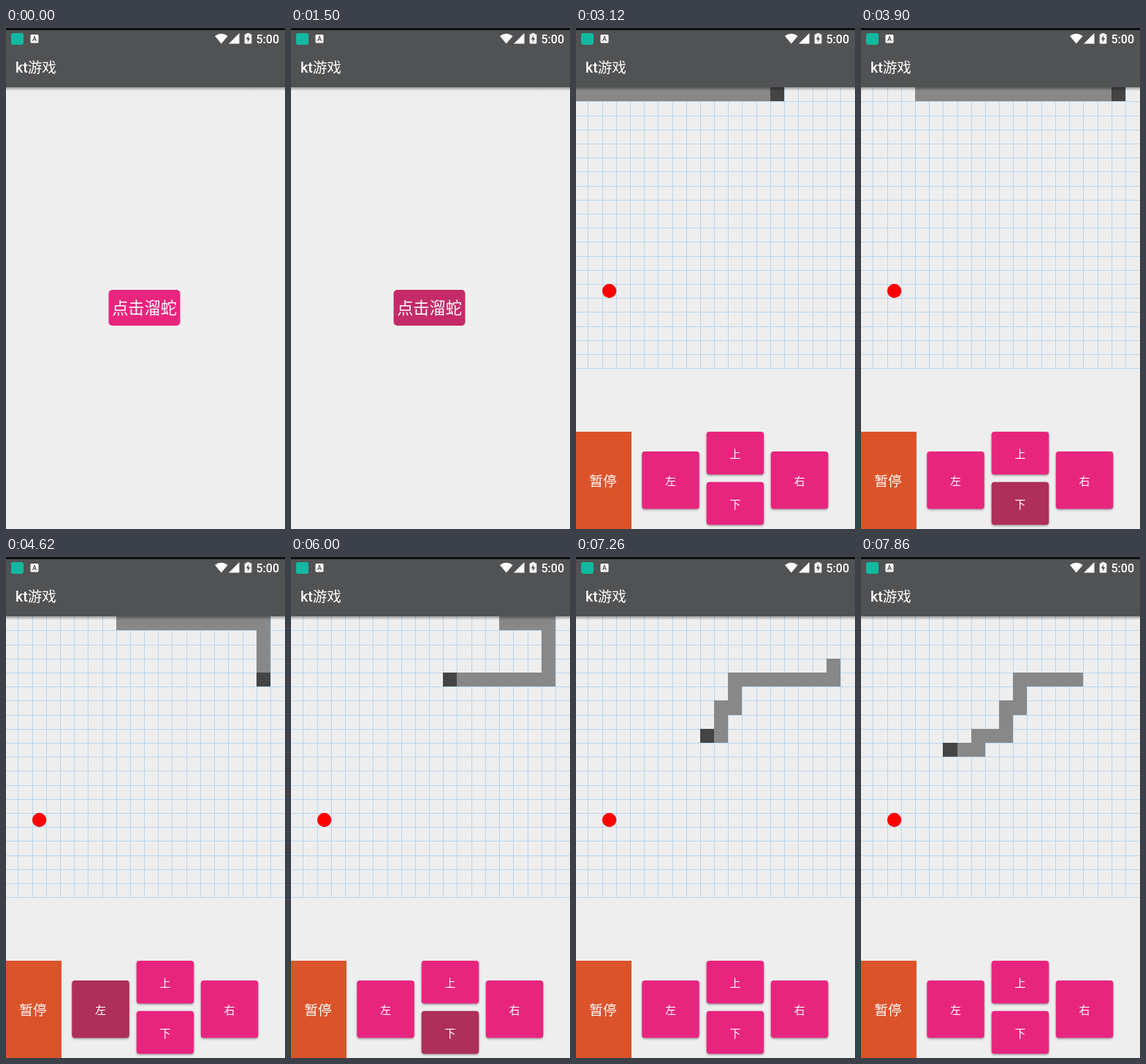
These frames come from a looping animation (382x685 px, 8 s). An HTML page with a canvas:

```html
<!DOCTYPE html>
<html lang="zh-CN">
<head>
<meta charset="utf-8">
<style>
html, body { margin: 0; width: 100%; height: 100%; overflow: hidden; background: #eee; }
canvas { display: block; width: 382px; height: 685px; }
</style>
</head>
<body>
<canvas id="stage"></canvas>
<script>
const W = 382, H = 685, LOOP = 8000, TICK = 60, CELL = 19.2, LENGTH = 15;
const PINK = [232, 37, 126], DARK = [174, 47, 90];
const FONT = 'Roboto, "Noto Sans CJK SC", "Noto Sans CJK", sans-serif';

const canvas = document.getElementById('stage');
const ctx = canvas.getContext('2d');
const dpr = window.devicePixelRatio || 1;
canvas.width = W * dpr;
canvas.height = H * dpr;

// Times of the snake's steps and of the taps on the direction buttons
const steps = [3240, 3420, 3660, 3840, 4020, 4200, 4380, 4620, 4800, 4980, 5160, 5460, 5580,
  5760, 5940, 6120, 6300, 6540, 6720, 6900, 7140, 7320, 7500, 7680, 7860];
const taps = {
  左: [4620, 6360, 6840, 7500],
  下: [3840, 5940, 6600, 7320]
};

const path = [[0, 0]];
for (const [dx, dy, n] of [[1, 0, 18], [0, 1, 4], [-1, 0, 7], [0, 1, 2], [-1, 0, 1],
  [0, 1, 2], [-1, 0, 2], [0, 1, 1], [-1, 0, 2]]) {
  for (let i = 0; i < n; i++) {
    const [x, y] = path[path.length - 1];
    path.push([x + dx, y + dy]);
  }
}

const colX = c => Math.floor(CELL * c - 2.4);
const rowY = r => Math.round(CELL * r + 81.1);

function rect(x, y, w, h, color) {
  ctx.fillStyle = color;
  ctx.fillRect(x, y, w, h);
}

function shape(points, color) {
  ctx.fillStyle = color;
  ctx.beginPath();
  points.forEach(p => ctx.lineTo(...p));
  ctx.fill();
}

function rounded(x, y, w, h, r, color) {
  ctx.fillStyle = color;
  ctx.beginPath();
  ctx.roundRect(x, y, w, h, r);
  ctx.fill();
}

function text(str, x, y, size, weight = 400, align = 'left', color = '#fff') {
  ctx.font = `${weight} ${size}px ${FONT}`;
  ctx.textAlign = align;
  ctx.fillStyle = color;
  ctx.fillText(str, x, y);
}

const label = (str, x, y, size) => text(str, x, y + size * 0.38, size, 400, 'center');

const pinkAt = k => `rgb(${PINK.map((v, i) => v + (DARK[i] - v) * k)})`;

function tapLevel(name, t) {
  const start = (taps[name] || []).findLast(s => s <= t);
  return start === undefined ? 0 : Math.max(0, Math.min(1, (180 - t + start) / 120));
}

function button(name, x, y, h, t) {
  ctx.save();
  ctx.shadowColor = 'rgba(0,0,0,.35)';
  ctx.shadowBlur = 3 * dpr;
  ctx.shadowOffsetY = 1.5 * dpr;
  rounded(x, y, 78.5, h, 4, pinkAt(tapLevel(name, t)));
  ctx.restore();
  label(name, x + 39.2, y + h / 2 + 1, 15);
}

function drawGame(t) {
  for (let c = 1; c <= 19; c++) rect(colX(c), 81, 1, 384, '#b9d6ee');
  for (let r = 1; r <= 20; r++) rect(0, rowY(r), W, 1, '#b9d6ee');

  ctx.fillStyle = '#f00';
  ctx.beginPath();
  ctx.arc(45.6, 359.5, 9.7, 0, 7);
  ctx.fill();

  const moved = steps.filter(s => s <= t).length;
  path.slice(moved, moved + LENGTH).forEach(([c, r], i) => {
    const x = colX(c), y = rowY(r);
    rect(x, y, colX(c + 1) - x, rowY(r + 1) - y, i === LENGTH - 1 ? '#444' : '#888');
  });

  rect(0, 552, 76, 140, '#dc532a');
  label(t < 3120 ? '开始' : '暂停', 37, 619, 18.7);
  button('左', 90.3, 579, 78.5, t);
  button('上', 178.7, 552, 58.5, t);
  button('下', 178.7, 620.7, 58.5, t);
  button('右', 266.8, 579, 78.5, t);
}

function drawMenu(t) {
  const k = t < 1500 ? 0 : t < 1620 ? 0.6 : 1;
  rounded(140.5, 358, 98, 49, 5, pinkAt(k));
  label('点击溜蛇', 189.5, 383, 22.2);
}

function drawToolbar() {
  const shade = ctx.createLinearGradient(0, 81, 0, 86);
  shade.addColorStop(0, 'rgba(0,0,0,.35)');
  shade.addColorStop(1, 'rgba(0,0,0,0)');
  rect(0, 81, W, 5, shade);
  rect(0, -10, W, 91, '#515254');
  text('kt游戏', 13, 61.3, 19.6, 500);
}

function drawStatus() {
  rect(0, 0, W, 28, '#515254');
  rect(0, 0, W, 3, '#0d1012');
  rounded(7, 7, 17, 16, 3, '#12b9a0');
  rounded(33.5, 9, 11, 11.5, 1.5, '#fff');
  text('A', 39, 18.2, 9, 700, 'center', '#515254');

  ctx.fillStyle = '#fff';
  ctx.beginPath();
  ctx.moveTo(294.8, 21.5);
  ctx.lineTo(286, 11);
  ctx.quadraticCurveTo(294.8, 4.4, 303.6, 11);
  ctx.fill();
  shape([[305, 21.5], [319.5, 21.5], [319.5, 7]], '#fff');
  rounded(326.7, 8.5, 9.6, 13, 1, '#fff');
  rect(329.5, 7, 4, 2, '#fff');
  shape([[332.3, 10], [328.6, 15.6], [331, 15.6], [330.7, 19.6], [334.4, 14], [332, 14]], '#515254');
  text('5:00', 374, 20.8, 16, 500, 'right');
}

function draw(now) {
  const t = Math.floor((now % LOOP) / TICK) * TICK;
  const inGame = t >= 1860;
  const slide = inGame ? 6 * Math.max(0, 1 - (t - 1860) / 120) ** 2 : 0;
  ctx.setTransform(dpr, 0, 0, dpr, 0, 0);
  rect(0, 0, W, H, '#eee');
  ctx.save();
  ctx.translate(0, slide);
  (inGame ? drawGame : drawMenu)(t);
  drawToolbar();
  ctx.restore();
  drawStatus();
}

const origin = performance.now();
function loop() {
  draw(performance.now() - origin);
  requestAnimationFrame(loop);
}
loop();
</script>
</body>
</html>
```
